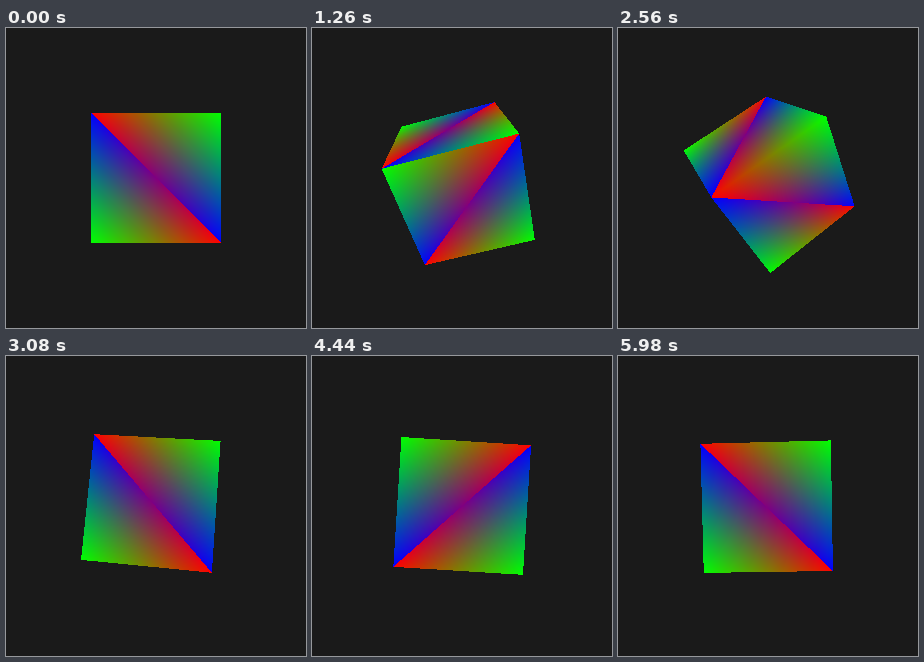
An HTML page with a canvas that plays this animation: 300x300 px, repeating every 6000 ms.

```html
<!DOCTYPE html>
<html lang="en">
<head>
<meta charset="utf-8">
<title>Spinning cube</title>
<style>
  html, body { margin: 0; width: 100%; height: 100%; overflow: hidden; background: #1a1a1a; }
  canvas { display: block; width: 100vw; height: 100vh; }
</style>
</head>
<body>
<canvas id="stage" width="300" height="300"></canvas>
<script>
const SIZE = 300, LOOP = 6000, STEP = 20;
const CAMERA = 5;                                  // distance to the cube's centre
const FOCAL = SIZE / 2 / Math.tan(Math.PI / 6);    // 60 degree field of view
const BACKGROUND = 0xff1a1a1a;

// Corners are signs of x, y, z; each triangle lists its red, green and blue corner.
// The two remaining faces never turn towards the camera.
const FACES = [
  { axis: 2, side: 1,  tris: ["-++ +++ +-+", "+-+ --+ -++"] },
  { axis: 1, side: -1, tris: ["+-- --- --+", "--+ +-+ +--"] },
  { axis: 0, side: 1,  tris: ["+-+ +-- ++-", "++- +++ +-+"] },
  { axis: 1, side: 1,  tris: ["++- -+- -++", "-++ +++ ++-"] }
].map(face => ({ ...face, tris: face.tris.map(parseTri) }));

const ctx = document.getElementById("stage").getContext("2d");
const image = ctx.createImageData(SIZE, SIZE);
const pixels = new Uint32Array(image.data.buffer);

function parseTri(text) {
  return text.split(" ").map(corner => [...corner].map(sign => sign === "+" ? 1 : -1));
}

// Rx(-a) * Ry(a) * Rz(-a)
function rotation(a) {
  const s = Math.sin(a), c = Math.cos(a);
  return [
    [c * c, c * s, s],
    [-c * s - s * s * c, c * c - s * s * s, s * c],
    [s * s - c * c * s, -s * c - c * s * s, c * c]
  ];
}

function project(m, p) {
  const [x, y, z] = m.map(row => row[0] * p[0] + row[1] * p[1] + row[2] * p[2]);
  const w = 1 / (CAMERA - z);
  return { x: SIZE / 2 + FOCAL * x * w, y: SIZE / 2 - FOCAL * y * w, w };
}

function edge(a, b, x, y) {
  return (b.x - a.x) * (y - a.y) - (b.y - a.y) * (x - a.x);
}

// Perspective-correct colour blend between the three corners
function fillTri(r, g, b) {
  const area = edge(r, g, b.x, b.y);
  const xs = [r.x, g.x, b.x], ys = [r.y, g.y, b.y];
  const left = Math.floor(Math.min(...xs)), right = Math.ceil(Math.max(...xs));
  const top = Math.floor(Math.min(...ys)), bottom = Math.ceil(Math.max(...ys));
  for (let y = top; y < bottom; y++) {
    for (let x = left; x < right; x++) {
      const px = x + 0.5, py = y + 0.5;
      let u = edge(g, b, px, py) / area;
      let v = edge(b, r, px, py) / area;
      let t = 1 - u - v;
      if (u < -1e-9 || v < -1e-9 || t < -1e-9) continue;
      u *= r.w; v *= g.w; t *= b.w;
      const k = 255 / (u + v + t);
      const level = n => Math.max(0, Math.round(n * k));
      pixels[y * SIZE + x] = (255 << 24 | level(t) << 16 | level(v) << 8 | level(u)) >>> 0;
    }
  }
}

function draw(time) {
  const m = rotation(time / LOOP * 2 * Math.PI);
  pixels.fill(BACKGROUND);
  for (const { axis, side, tris } of FACES) {
    if (m[2][axis] * side * CAMERA <= 1) continue;
    for (const tri of tris) fillTri(...tri.map(p => project(m, p)));
  }
  ctx.putImageData(image, 0, 0);
}

const start = performance.now();
function tick() {
  const time = Math.max(0, performance.now() - start) % LOOP;
  draw(Math.floor(time / STEP + 0.01) * STEP);
  requestAnimationFrame(tick);
}
tick();
</script>
</body>
</html>
```
